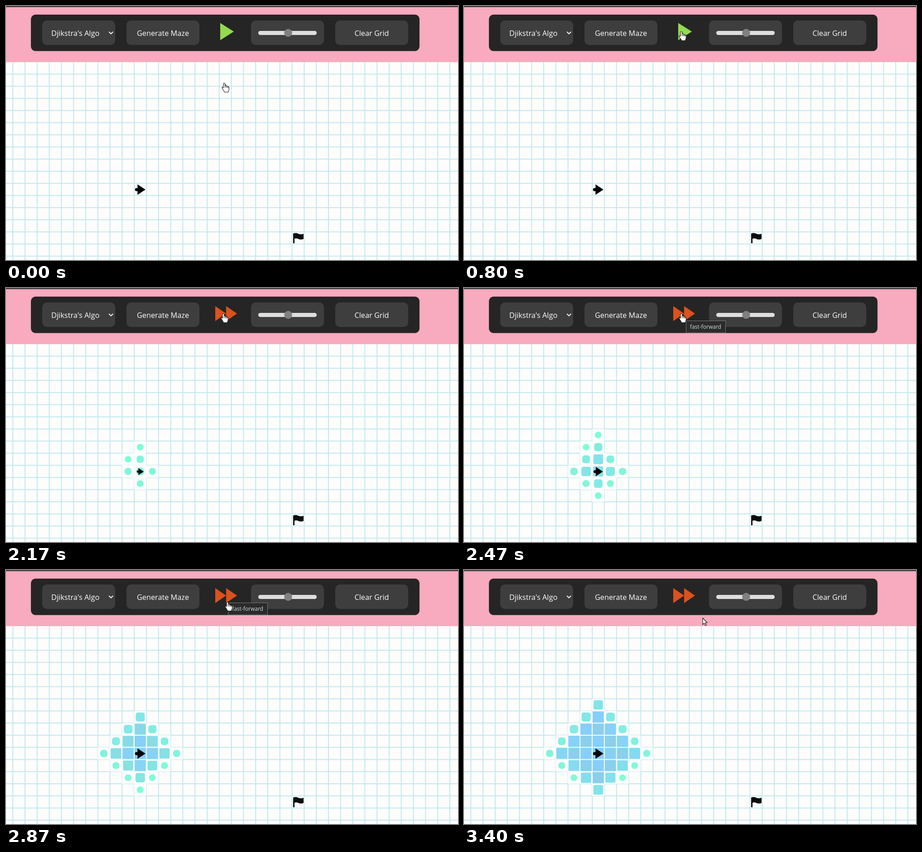
An HTML page with a canvas that plays this animation: 998 px wide and 561 px high, repeating every 3430 ms.

```html
<!DOCTYPE html>
<html lang="en">
<head>
<meta charset="utf-8">
<title>Pathfinding visualizer</title>
<style>
  html, body { margin: 0; width: 100%; height: 100%; overflow: hidden; background: #fdfdfc; }
  canvas { display: block; }
</style>
</head>
<body>
<canvas id="stage" width="998" height="561"></canvas>
<script>
const ctx = document.getElementById('stage').getContext('2d');
const LOOP = 3430;
const CELL = 26.8;
const HEADER = 124;
const START = { x: 296.4, y: 405.1 };
const SEARCH_AT = 1895, CELL_DELAY = 40, GROW = 900, TINT = 950;
const PLAY_AT = 1800;

// Pointer hotspot: time, x, y
const POINTER = [
  [0, 482, 171], [200, 480, 131], [370, 479.5, 103], [530, 480, 79], [700, 480, 62], [800, 480, 57],
  [2700, 480, 57], [2870, 489, 71], [3080, 506, 87], [3260, 521, 101], [3400, 527, 106], [LOOP, 527, 106]
];

const HAND = new Path2D('M-2 1C-2-1 1.6-1 1.6 1V6C2-0 4.6 5 4.8 6.6C6 5.4 7.6 6.2 7.8 7.6C9 6.8 10.4 7.6 10.4 9.2V13C10.4 15.5 9 16.5 8.8 19.5H0.2C0 17-2.2 15.4-3.6 12.6C-4.8 10.6-6 9.6-4.6 8.6C-3.6 8-2.6 9-2 10Z');
const KNUCKLES = new Path2D('M1.6 5V9.5M4.8 6.6V10M7.8 7.6V10.5');
const ARROW = new Path2D('M0 0V14.5L3.4 11.4L5.8 16.8L8.2 15.7L5.8 10.5H10Z');
const FLAG = new Path2D('M634 502.5Q640 500.5 645.5 503Q651 505.5 657 503V514.5Q651 517 645.5 514.5Q641 512.5 637 514V524H634Z');

// Breadth-first rings around the start, each listed top to bottom, left to right
const cells = [];
for (let ring = 0; ring < 6; ring++) {
  for (let row = -ring; row <= ring; row++) {
    const col = ring - Math.abs(row);
    for (const c of col ? [-col, col] : [0]) {
      cells.push({ ring, x: START.x + c * CELL, y: START.y + row * CELL });
    }
  }
}

const clamp = v => Math.max(0, Math.min(1, v));
const mix = (a, b, k) => a + (b - a) * k;
const easeInOut = p => p < 0.5 ? 2 * p * p : 1 - 2 * (1 - p) * (1 - p);

function box(x, y, w, h, r, fill) {
  ctx.fillStyle = fill;
  ctx.beginPath();
  ctx.roundRect(x, y, w, h, r);
  ctx.fill();
}

function triangle(x, y, w, h, fill) {
  ctx.fillStyle = fill;
  ctx.beginPath();
  ctx.moveTo(x, y - h / 2);
  ctx.lineTo(x + w, y);
  ctx.lineTo(x, y + h / 2);
  ctx.fill();
}

function disc(x, y, r, fill) {
  ctx.fillStyle = fill;
  ctx.beginPath();
  ctx.arc(x, y, r, 0, 7);
  ctx.fill();
}

function label(text, x, y, size, fill) {
  ctx.font = `${size}px "Open Sans", "Noto Sans", sans-serif`;
  ctx.textAlign = 'center';
  ctx.fillStyle = fill;
  ctx.fillText(text, x, y);
}

function drawGrid() {
  ctx.fillStyle = '#fdfdfc';
  ctx.fillRect(0, 0, 998, 561);
  ctx.fillStyle = '#c3e8ef';
  for (let x = 15.2; x < 998; x += CELL) ctx.fillRect(x - 1, HEADER, 2, 561);
  for (let y = 150.5; y < 561; y += CELL) ctx.fillRect(0, y - 1, 998, 2);
}

function drawCell(cell, age) {
  const grown = easeInOut(clamp(age / GROW));
  const tint = clamp(age / TINT);
  const size = mix(14.6, 24.8, grown);
  const end = cell.ring === 2 ? [138, 207, 237] : [135, 206, 250];
  const color = [127, 255, 212].map((v, i) => Math.round(mix(v, end[i], tint)));
  box(cell.x - CELL / 2, cell.y - CELL / 2, CELL, CELL, 0, '#fdfdfd');
  box(cell.x - size / 2, cell.y - size / 2, size, size, size / 2 * (1 - grown), `rgb(${color})`);
}

function drawStart(age) {
  const scale = age < 0 ? 1 : mix(0.6, 1, easeInOut(clamp(age / GROW)));
  ctx.save();
  ctx.translate(START.x, START.y + 0.4);
  ctx.scale(scale, scale);
  disc(-8, 0, 3.6, '#000');
  triangle(-6, 0, 17.5, 23, '#000');
  ctx.restore();
}

function drawToolbar(t) {
  ctx.fillStyle = '#f8aabe';
  ctx.fillRect(0, 0, 998, HEADER);
  ctx.fillStyle = '#3c383d';
  ctx.fillRect(0, 0, 998, 2.5);
  box(55, 19, 858, 80.5, 10, '#252525');
  for (const x of [80, 266, 541, 727]) box(x, 32, 161, 54, 10, '#3e3e3e');

  label("Djikstra's Algo", 153.2, 66, 16.4, '#fff');
  label('Generate Maze', 346.5, 66, 16.3, '#fff');
  label('Clear Grid', 807.5, 66, 16.3, '#fff');

  ctx.strokeStyle = '#fff';
  ctx.lineWidth = 1.8;
  ctx.beginPath();
  ctx.moveTo(227.3, 57);
  ctx.lineTo(231.8, 61.5);
  ctx.lineTo(236.3, 57);
  ctx.stroke();

  box(557, 55, 129, 9, 4.5, '#dedede');
  disc(623, 59.3, 8.7, '#808080');

  if (t < PLAY_AT) {
    triangle(473, 56.5, 30, 38, '#94da4f');
  } else {
    triangle(462, 56.5, 24, 33, '#da521e');
    triangle(486, 56.5, 24, 33, '#da521e');
  }
}

function drawTooltip(opacity) {
  ctx.globalAlpha = opacity;
  box(490, 72, 88, 27.5, 0, '#7b7b7b');
  box(491, 73, 86, 25.5, 0, '#2b2b2b');
  label('fast-forward', 533.5, 90, 12, '#dcdcdc');
  ctx.globalAlpha = 1;
}

function pointerAt(t) {
  const i = POINTER.findIndex(p => p[0] > t);
  const [t0, x0, y0] = POINTER[i - 1], [t1, x1, y1] = POINTER[i];
  const k = (t - t0) / (t1 - t0);
  return { x: mix(x0, x1, k), y: mix(y0, y1, k) };
}

function drawPointer({ x, y }, clickable) {
  ctx.save();
  ctx.translate(x, y);
  ctx.fillStyle = '#fff';
  ctx.strokeStyle = '#111';
  ctx.lineWidth = 1.1;
  ctx.lineJoin = 'round';
  const shape = clickable ? HAND : ARROW;
  ctx.fill(shape);
  ctx.stroke(shape);
  if (clickable) ctx.stroke(KNUCKLES);
  ctx.restore();
}

function draw(t) {
  const pointer = pointerAt(t);
  const clickable = pointer.y < 84 || pointer.y > HEADER;
  const searchTime = t - SEARCH_AT;

  drawGrid();
  cells.forEach((cell, i) => {
    const age = searchTime - i * CELL_DELAY;
    if (age >= 0) drawCell(cell, age);
  });
  drawStart(searchTime);
  ctx.fillStyle = '#0c0c0c';
  ctx.fill(FLAG);
  drawToolbar(t);
  if (t > 2250 && clickable) drawTooltip(clamp((t - 2250) / 150));
  drawPointer(pointer, clickable);
}

const began = performance.now();
function frame() {
  draw((performance.now() - began) % LOOP);
  requestAnimationFrame(frame);
}
frame();
</script>
</body>
</html>
```
